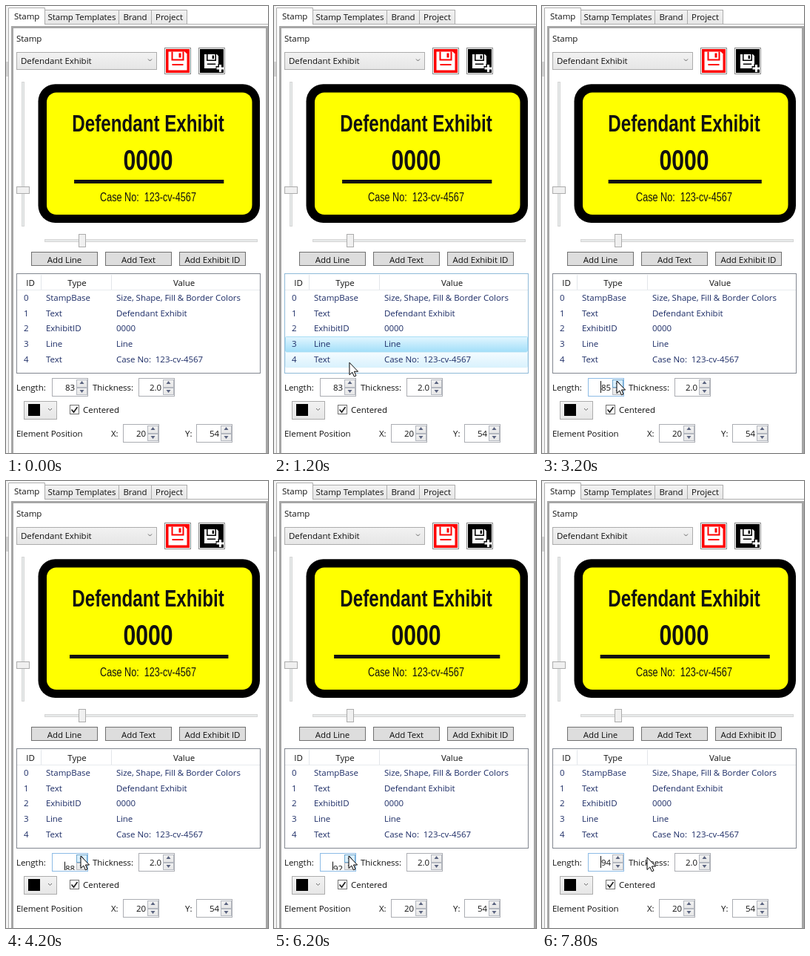
An HTML page for the animation above (8000 ms loop, 354 px wide and 602 px high).

```html
<!DOCTYPE html>
<html lang="en">
<meta charset="utf-8">
<title>Stamp editor</title>
<style>
html, body { margin: 0; height: 100%; overflow: hidden; background: #fff; }
svg { display: block; font: 11.5px "Open Sans", "Noto Sans", sans-serif; letter-spacing: -.04px; fill: #111; }
.stamp { font-family: "Liberation Sans", Arial, sans-serif; letter-spacing: 0; text-anchor: middle; }
.mid { text-anchor: middle; }
.end { text-anchor: end; }
.row { fill: #1c2c66; }
</style>
<svg id="stage" width="354" height="602" viewBox="0 0 354 602"></svg>
<script>
const stage = document.getElementById('stage');
const $ = id => document.getElementById(id);

// Shape helpers; crisp boxes sit on half pixels
const box = (x, y, w, h, fill, line, more = '') => line
  ? `<rect x="${x + .5}" y="${y + .5}" width="${w - 1}" height="${h - 1}" fill="${fill}" stroke="${line}" ${more}/>`
  : `<rect x="${x}" y="${y}" width="${w}" height="${h}" fill="${fill}" ${more}/>`;
const text = (x, y, s, cls = '', more = '') =>
  `<text x="${x}" y="${y}" class="${cls}" xml:space="preserve" ${more}>${s}</text>`;
const path = (d, line, width = 1, fill = 'none') =>
  `<path d="${d}" fill="${fill}" stroke="${line}" stroke-width="${width}"/>`;
const grad = (id, a, b) =>
  `<linearGradient id="${id}" x2="0" y2="1"><stop stop-color="${a}"/><stop offset="1" stop-color="${b}"/></linearGradient>`;

const tab = (x, w, s) => box(x, 5, w, 20, 'url(#face)', '#acacac') + text(x + w / 2, 19, s, 'mid');
const chevron = (x, y) => path(`M${x - 2.5} ${y - 1.5}l2.5 2.5 2.5-2.5`, '#666');
const combo = (x, y, w, h) => box(x, y, w, h, 'url(#face)', '#acacac');
const button = (x, s) => box(x, 331, 90, 19, '#ddd', '#707070') + text(x + 45, 345.5, s, 'mid');
const arrows = (x, y) => `<path d="M${x} ${y + 8}l3-4 3 4zM${x} ${y + 16}h6l-3 4z" fill="#5b6480"/>`;
const spin = (x, y, s, id = '') =>
  box(x, y, 49, 25, '#fff', '#abadb3', id && `id="${id}"`) +
  (s ? text(x + 31, y + 17, s, 'end') : '') +
  box(x + 33, y + 2, 15, 11, 'url(#face)', '#b4b8c0', id && `id="${id}Up"`) +
  box(x + 33, y + 13, 15, 10, 'url(#face)', '#b4b8c0') + arrows(x + 37.5, y);
const save = (x, back) => box(x, 56, 36, 36, '#fff', '#8a8a8a') + box(x + 2, 58, 32, 32, back);
const floppy = (x, y, k, back) => `<g transform="translate(${x} ${y}) scale(${k})">
  <path d="M0 0H22L25 3V25H0z" fill="#fff"/>
  ${path('M5 0V11H20V0M5 17.5H20', back, 2)}
  <path d="M14 2H17V8H14z" fill="${back}"/></g>`;

const rows = [
  ['StampBase', 'Size, Shape, Fill &amp; Border Colors'],
  ['Text', 'Defendant Exhibit'],
  ['ExhibitID', '0000'],
  ['Line', 'Line'],
  ['Text', 'Case No:  123-cv-4567']
];
const rowTop = i => Math.round(383 + i * 20.7);

stage.innerHTML = `<defs>
  ${grad('face', '#f2f2f2', '#e6e6e6')}${grad('chosen', '#e3f6ff', '#a3dff9')}${grad('warm', '#f4fbff', '#d9f2fd')}
  <clipPath id="field"><rect x="63" y="503" width="32" height="21"/></clipPath></defs>` +
  // Window and tabs
  box(0, 0, 354, 602, '#fff') + box(0, 0, 3, 602, '#f3f3f3') + box(0, 75, 3, 20, '#d0d0d0') +
  path('M3.5 602V2.5H52.5V24.5H354', '#acacac') +
  tab(52, 101, 'Stamp Templates') + tab(152, 45, 'Brand') + tab(196, 49, 'Project') +
  text(11, 18, 'Stamp') + path('M352.5 602V28.5H8.5V602', '#a6a6a6', 3) +
  text(14, 48, 'Stamp') + combo(14, 62, 190, 24) + text(20, 78, 'Defendant Exhibit') + chevron(194.5, 73) +
  // Save buttons
  save(214, '#f00') + floppy(219.5, 61.5, 1, '#f00') +
  save(260, '#000') + floppy(268, 65, .76, '#000') +
  path('M289.5 78V90M283.5 84H294', '#000', 6) + path('M289.5 79V89M284.5 84H294.5', '#fff', 3) +
  // Sliders
  box(21, 102, 4, 195, '#e7eaea', '#d6d6d6') + box(14, 243, 18, 10, '#f0f0f0', '#acacac') +
  box(52, 314, 288, 4, '#e7eaea', '#d6d6d6') + box(98, 307, 10, 18, '#f0f0f0', '#acacac') +
  // Stamp preview
  box(43.5, 105.3, 299.5, 186.7, '#000', '', 'rx="23"') + box(55, 116.5, 277.5, 164.5, '#ff0', '', 'rx="13"') +
  `<g class="stamp" transform="translate(192 0) scale(.78 1)">
    ${text(0, 169, 'Defendant Exhibit', '', 'font-size="31" font-weight="700"')}
    ${text(0, 221.5, '0000', '', 'font-size="38.7" font-weight="700"')}
    ${text(0, 263, 'Case No:  123-cv-4567', '', 'font-size="16.2"')}</g>` +
  `<rect id="rule" y="234" height="5"/>` +
  button(34, 'Add Line') + button(134, 'Add Text') + button(234, 'Add Exhibit ID') +
  // Element list
  box(14, 360, 330, 135, '#fff', '#828790', 'id="list"') +
  path('M47.5 362V382M142.5 362V382', '#e2e6ea') + path('M15 382.5H343', '#e8ebee') +
  text(33, 377, 'ID', 'mid') + text(96, 377, 'Type', 'mid') + text(240.5, 377, 'Value', 'mid') +
  rows.map(([type, value], i) => {
    const y = rowTop(i), base = y + 14;
    return `<rect id="row${i}" x="15.5" y="${y + .5}" width="327" height="20" rx="1"/>` +
      text(24, base, i, 'row') + text(54, base, type, 'row') + text(149, base, value, 'row');
  }).join('') +
  // Element settings
  text(14, 518, 'Length:') + spin(62, 501, '', 'length') +
  `<g clip-path="url(#field)"><g id="digits">${text(93, 518, '', 'end', 'id="value"')}
    <rect id="caret" x="79" y="505" width="1" height="16"/></g></g>` +
  text(117, 518, 'Thickness:') + spin(179, 501, '2.0') +
  combo(24, 532, 45, 25) + box(30, 536, 16, 16, '#000') + chevron(59.5, 543.5) +
  box(86, 537, 13, 13, '#fff', '#707070') + path('M88.5 543.5l3 3.5 5-7', '#222', 1.7) + text(104, 548, 'Centered') +
  text(14, 580, 'Element Position') + text(142, 580, 'X:') + spin(158, 563, '20') +
  text(242, 580, 'Y:') + spin(257, 563, '54') +
  `<path id="pointer" d="M0 0V16.5L3.8 13 6.4 18.8 9 17.7 6.4 12H11.6z" fill="#fff" stroke="#000"/>`;

// Pointer stops: time, x, y
const stops = [
  [200, 60, 552], [400, 118, 520], [600, 108, 478], [800, 98, 456], [1050, 98, 456], [1200, 102, 480],
  [1400, 92, 524], [1600, 112, 550], [1800, 126, 558], [2020, 126, 558], [2200, 116, 512],
  [2420, 116, 512], [2590, 101, 505], [7620, 101, 505], [7790, 142, 507], [8000, 142, 507]
];
const clicks = [2720, 2960, 3540, 3900, 4170, 4700, 5080, 5500, 6167, 6560, 6960];
const slide = 220;

function pointerAt(t) {
  const i = Math.max(1, stops.findIndex(s => s[0] > t));
  const [t0, x0, y0] = stops[i - 1], [t1, x1, y1] = stops[i];
  const p = Math.max(0, (t - t0) / (t1 - t0));
  return [x0 + (x1 - x0) * p, y0 + (y1 - y0) * p];
}

function paint(el, fill, line) {
  el.setAttribute('fill', fill);
  el.setAttribute('stroke', line);
}

function draw() {
  const t = performance.now() % 8000;
  const [x, y] = pointerAt(t);
  $('pointer').setAttribute('transform', `translate(${x} ${y})`);
  $('pointer').style.display = t < 200 ? 'none' : '';

  // Rows
  const picked = t >= 780 && t < clicks[0];
  const seen = t >= 200;
  rows.forEach((_, i) => {
    const over = seen && y >= rowTop(i) && y < rowTop(i + 1);
    if (i === 3 && picked) paint($('row3'), 'url(#chosen)', '#a8def5');
    else if (over) paint($('row' + i), 'url(#warm)', '#d8f1fb');
    else paint($('row' + i), 'none', 'none');
  });
  $('list').setAttribute('stroke', picked ? '#8fbad8' : '#828790');

  // Length field and the line it controls
  const done = clicks.filter(c => c <= t);
  const length = 83 + done.length;
  const p = done.length ? Math.min(1, (t - done.at(-1)) / slide) : 1;
  const width = length * 2.437;
  $('rule').setAttribute('x', 193.2 - width / 2);
  $('rule').setAttribute('width', width);
  $('value').textContent = length;
  $('digits').setAttribute('transform', `translate(0 ${9 * (1 - p)})`);
  $('caret').style.display = done.length && !(t >= 7300 && t < 7700) ? '' : 'none';
  $('length').setAttribute('stroke', done.length ? '#8dbce6' : '#abadb3');
  const over = t >= 2560 && t < 7640;
  paint($('lengthUp'), over ? '#daeffb' : 'url(#face)', over ? '#6fa8d0' : '#b4b8c0');

  requestAnimationFrame(draw);
}
draw();
</script>
</html>
```
